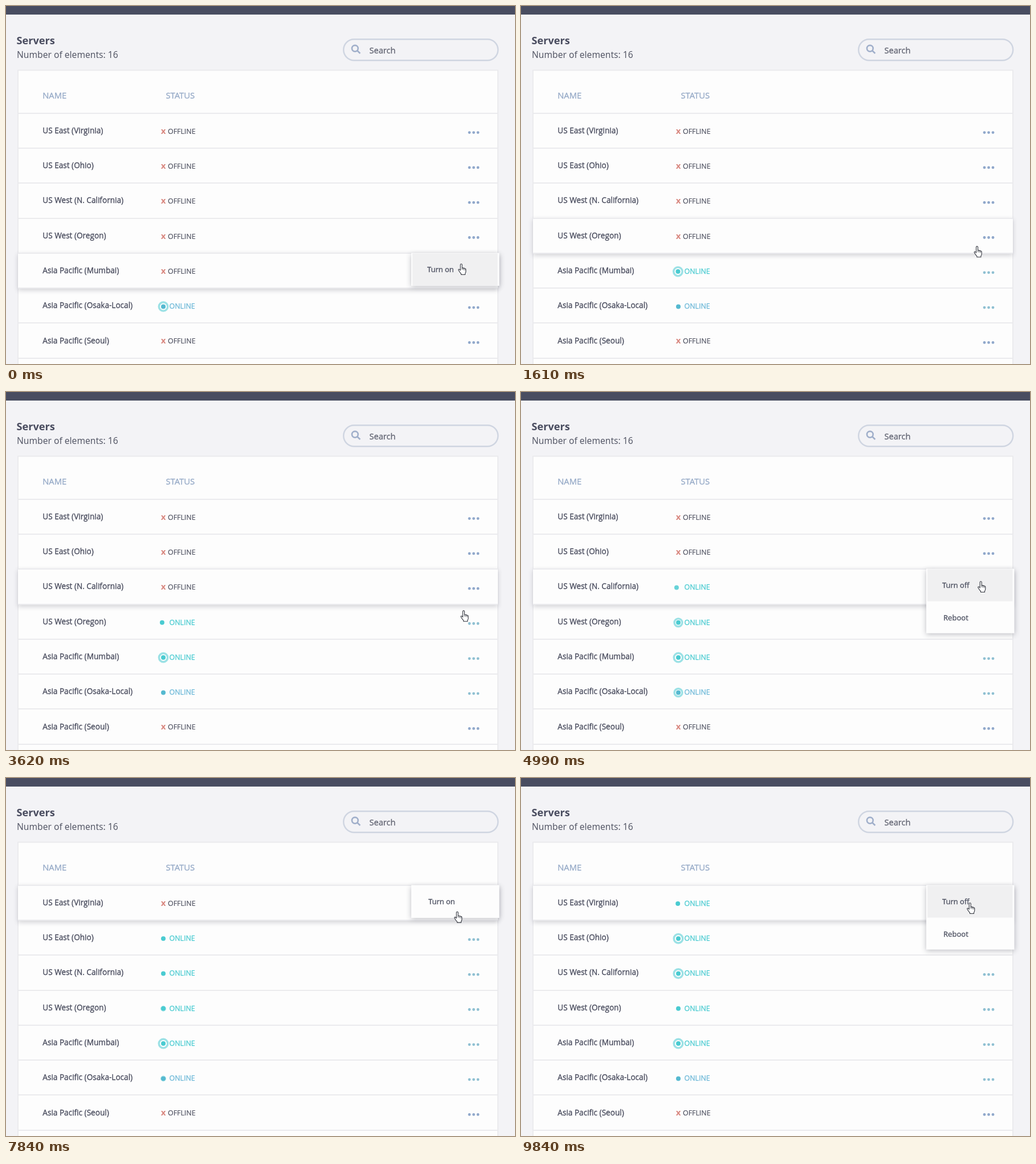
An HTML page with a canvas that plays this animation: 893x627 px, repeating every 9.94 s.

```html
<!DOCTYPE html>
<html lang="en">
<head>
<meta charset="utf-8">
<title>Servers</title>
<style>
html, body { margin: 0; width: 100%; height: 100%; overflow: hidden; background: #f3f3f6; }
canvas { display: block; }
</style>
</head>
<body>
<canvas id="stage" width="893" height="627"></canvas>
<script>
const ctx = document.getElementById('stage').getContext('2d');
const LOOP = 9940, PULSE = 1020;
const HOVER_LEAD = 300, CLICK_LENGTH = 180;
const ROW_TOP = 187.6, ROW_STEP = 61.3, ENTRY_DEPTH = 46;
const LEFT = 21, RIGHT = 863;
const SANS = '"Open Sans", sans-serif', NOTO = '"Noto Sans", sans-serif';
const INK = '#45485a', LINE = '#ebebee', TEAL = '#4acbd1', BLUE = '#6cb8d8';

const rows = [
  { name: 'US East (Virginia)', phase: 0.42 },
  { name: 'US East (Ohio)', phase: 0.29 },
  { name: 'US West (N. California)', phase: 0.29 },
  { name: 'US West (Oregon)', phase: 0.42 },
  { name: 'Asia Pacific (Mumbai)', phase: 0.85 },
  { name: 'Asia Pacific (Osaka-Local)', phase: 0.42, online: -LOOP, color: BLUE },
  { name: 'Asia Pacific (Seoul)' }
];

// The pointer works upwards: open a row's menu, click "Turn on", wait for the server.
const visits = [
  { row: 4, open: -1000, click: 340, online: 650, x: 793, y: 451 },
  { row: 3, open: 1680, click: 2670, online: 3080, x: 796, y: 407 },
  { row: 2, open: 3800, click: 4130, online: 4750, x: 801, y: 331 },
  { row: 1, open: 5450, click: 6170, online: 6590, x: 790, y: 288 },
  { row: 0, open: 7770, click: 8480, online: 8960, x: 782, y: 218 }
];
visits.forEach(v => { rows[v.row].online = v.online; });

const hand = new Path2D('M4.2 12V2.2a1.5 1.5 0 0 1 3 0V8q1.5-1 2.4.4 1.6-.7 2.3.6 1.9-.3 1.9 1.4V14q0 2-1.3 3.5V19.5H5.5V18Q3 15.5 1 11.8q-.6-1.6.8-1.8 1.3.2 2.4 2z');

const clamp = v => Math.max(0, Math.min(1, v));
const smooth = v => { v = clamp(v); return v * v * (3 - 2 * v); };
const mix = (a, b, k) => a + (b - a) * k;
const rowY = i => ROW_TOP + i * ROW_STEP;
const clickAt = t => visits.find(v => t >= v.click && t < v.click + CLICK_LENGTH);

function text(str, x, y, size, color, { family = SANS, weight = 400, boost = 0 } = {}) {
  ctx.font = `${weight} ${size}px ${family}`;
  ctx.fillStyle = ctx.strokeStyle = color;
  ctx.fillText(str, x, y);
  if (boost) {
    ctx.lineWidth = boost;
    ctx.strokeText(str, x, y);
  }
}

function box(x, y, w, h, color) {
  ctx.fillStyle = color;
  ctx.fillRect(x, y, w, h);
}

function disc(x, y, r, color) {
  ctx.fillStyle = color;
  ctx.beginPath();
  ctx.arc(x, y, r, 0, Math.PI * 2);
  ctx.fill();
}

function shadowBox(x, y, w, h, alpha, blur, dy) {
  ctx.save();
  ctx.shadowColor = `rgba(40,42,60,${alpha})`;
  ctx.shadowBlur = blur;
  ctx.shadowOffsetY = dy;
  box(x, y, w, h, '#fdfdfd');
  ctx.restore();
}

function rowLine(i) {
  box(LEFT, Math.round(rowY(i)) - 1, RIGHT - LEFT, 2, LINE);
}

// Enter a row near its lower edge, rise to the label to click, rest, move on.
function cursorAt(t) {
  const k = visits.findLastIndex((v, i) => i === 0 || t >= visits[i - 1].online + 300);
  const to = visits[k], from = visits[k - 1];
  if (!from) return [to.x, to.y];
  const entry = { x: (from.x + to.x) / 2, y: rowY(to.row) + ENTRY_DEPTH };
  const start = from.online + 300, arrive = to.open + 70;
  const travel = smooth((t - start) / (arrive - start));
  const aim = smooth((t - to.click + 140) / 140);
  return ['x', 'y'].map(axis => mix(mix(from[axis], entry[axis], travel), to[axis], aim));
}

function drawHeader() {
  box(0, 0, 893, 627, '#f3f3f6');
  box(0, 0, 893, 15, '#494d61');
  text('Servers', 18.5, 67, 18.2, '#494c5f', { weight: 700 });
  text('Number of elements: 16', 19, 90.5, 15.6, '#565968', { family: NOTO });

  ctx.strokeStyle = '#cfd5e1';
  ctx.lineWidth = 2.4;
  ctx.beginPath();
  ctx.roundRect(592.2, 58.2, 271, 37, 18.5);
  ctx.stroke();

  ctx.strokeStyle = '#a0afca';
  ctx.lineWidth = 2.6;
  ctx.beginPath();
  ctx.arc(612.3, 74.3, 5.4, 0, Math.PI * 2);
  ctx.moveTo(616.3, 78.3);
  ctx.lineTo(621.3, 83);
  ctx.stroke();
  text('Search', 637.5, 83, 14.6, '#606371', { boost: 0.3 });
}

function drawTable() {
  box(LEFT - 1, 111.5, RIGHT - LEFT + 2, 520, LINE);
  box(LEFT + 1, 113.5, RIGHT - LEFT - 2, 520, '#fdfdfd');
  text('NAME', 64.2, 162, 14.8, '#97abc8', { boost: 0.35 });
  text('STATUS', 280.5, 162, 14.8, '#97abc8', { boost: 0.35 });
  for (let i = 0; i <= rows.length; i++) rowLine(i);
}

function drawPulse(row, y, t) {
  const age = t - row.online;
  const x = 276 - 3.4 * (1 - smooth(age / 1300));
  const waiting = visits.find(v => t >= v.click + CLICK_LENGTH && t < v.online);
  const clock = waiting ? waiting.click + CLICK_LENGTH : t;
  const p = (clock / PULSE + row.phase) % 1;
  const grow = 1 - (1 - clamp((p - 0.07) / 0.4)) ** 2;
  const radius = 4 + 5.5 * grow;
  const inner = Math.max(4, radius - 3.4);
  if (grow && age > 900) {
    ctx.globalAlpha = 0.55 * (1 - smooth((p - 0.94) / 0.03));
    ctx.strokeStyle = TEAL;
    ctx.lineWidth = radius - inner;
    ctx.beginPath();
    ctx.arc(x, y, (radius + inner) / 2, 0, Math.PI * 2);
    ctx.stroke();
  }
  ctx.globalAlpha = smooth((age - 200) / 55);
  disc(x, y, 4, row.color ? '#55b9d0' : TEAL);
  ctx.globalAlpha = 1;
}

function drawRow(row, i, t) {
  const y = rowY(i);
  const online = t >= row.online;
  text(row.name, 64.3, y + 35.2, 13.6, INK, { boost: 0.3 });
  if (online) {
    drawPulse(row, y + 32.3, t);
    text('ONLINE', 286.5, y + 36, 12.4, row.color || TEAL, { boost: 0.3 });
  } else {
    text('x', 271.8, y + 36, 15, '#d98880', { weight: 700 });
    text('OFFLINE', 284, y + 36, 12.4, '#505362', { boost: 0.2 });
  }
  const tinted = online && t > visits[0].online;
  for (let k = 0; k < 3; k++) disc(813 + 7.5 * k, y + 34, 2.4, tinted ? '#8fc0d2' : '#90a8cb');
}

function drawMenu({ row, open, online }, t) {
  const running = t >= online;
  const hovered = t > open + 130;
  const top = Math.round(rowY(row)) - 0.5;
  shadowBox(711, top, 154.5, running ? 113 : 57.5, 0.3, 9, 2);
  if (hovered) box(713, top + 1, 149.5, 56, '#f0f0f1');
  const style = { family: NOTO, boost: 0.3 };
  const color = clickAt(t) ? '#5b8a83' : '#505464';
  text(running ? 'Turn off' : 'Turn on', hovered ? 739 : 741, top + 33.5, 12.8, color, style);
  if (running) text('Reboot', 741, top + 90, 13, '#505464', style);
}

function drawCursor(t) {
  const [x, y] = cursorAt(t);
  const click = clickAt(t);
  if (click) {
    ctx.globalAlpha = 0.9 * (1 - 0.5 * smooth((t - click.click - 110) / 70));
    disc(x + 5.5, y + 0.5, 12, '#f5ef58');
    ctx.globalAlpha = 1;
  }
  ctx.save();
  ctx.translate(x, y);
  ctx.fillStyle = '#fff';
  ctx.strokeStyle = '#33363f';
  ctx.lineWidth = 1.1;
  ctx.lineJoin = 'round';
  ctx.fill(hand);
  ctx.stroke(hand);
  ctx.beginPath();
  for (let k = 0; k < 3; k++) {
    ctx.moveTo(7.2 + 2.35 * k, 8 + 0.6 * k);
    ctx.lineTo(7.2 + 2.35 * k, 11 + 0.6 * k);
  }
  ctx.lineWidth = 0.8;
  ctx.stroke();
  ctx.restore();
}

function draw(t) {
  const visit = visits.findLast(v => t >= v.open - HOVER_LEAD);
  const active = visit.row;
  drawHeader();
  drawTable();
  rows.forEach((row, i) => { if (i !== active) drawRow(row, i, t); });

  const top = Math.round(rowY(active)) - 1;
  shadowBox(LEFT, top, RIGHT - LEFT, Math.round(rowY(active + 1)) + 1 - top, 0.2, 8, 3);
  rowLine(active);
  rowLine(active + 1);
  drawRow(rows[active], active, t);
  if (t >= visit.open) drawMenu(visit, t);
  drawCursor(t);
}

function frame() {
  draw(performance.now() % LOOP);
  requestAnimationFrame(frame);
}
frame();
</script>
</body>
</html>
```
